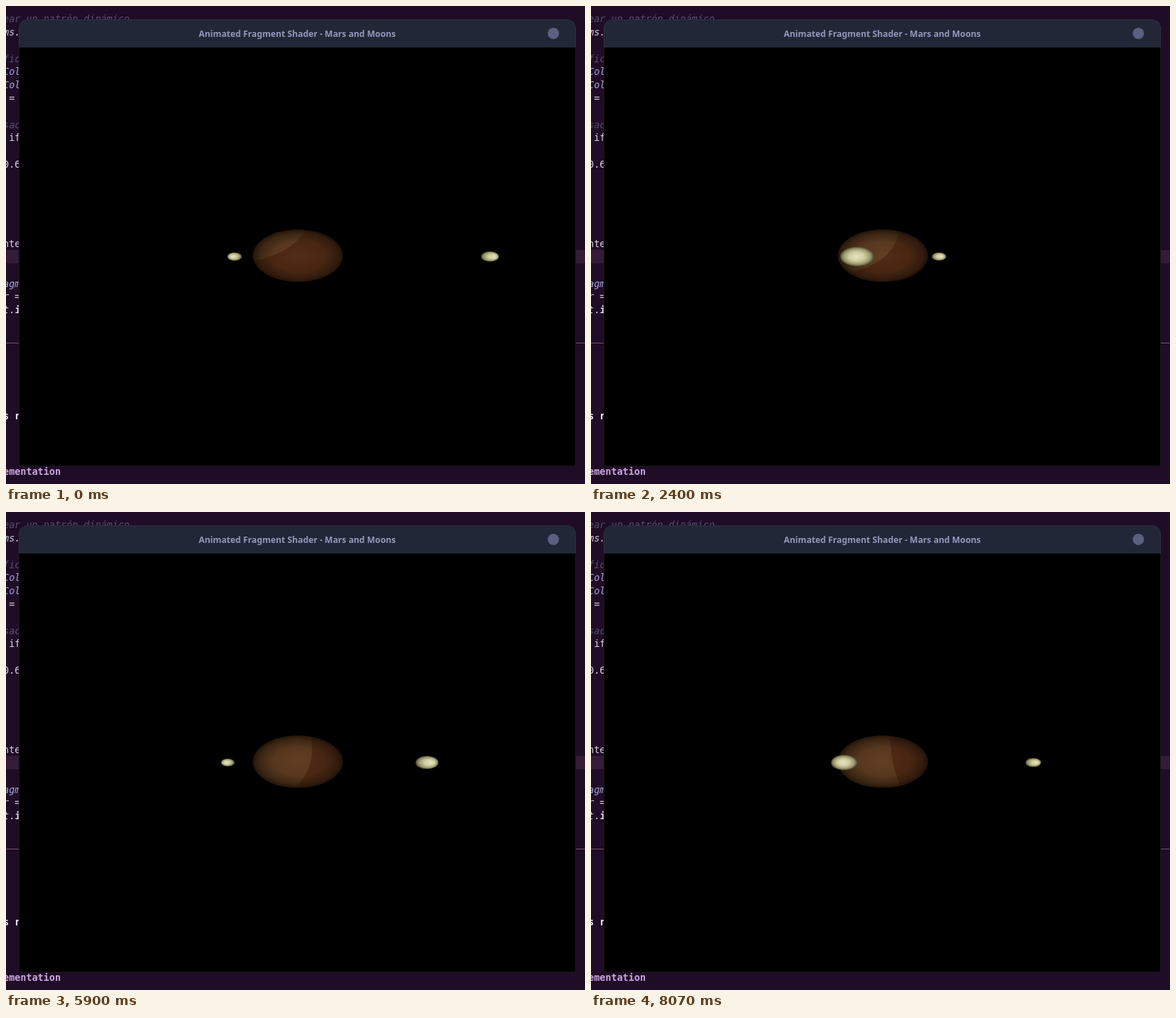
Recreate the animation shown at these times as an HTML page with a canvas. Size 824 by 680 pixels, loop 8.11 s.

```html
<!DOCTYPE html>
<html lang="en">
<head>
<meta charset="utf-8">
<title>Mars and Moons</title>
<style>
  html, body { margin: 0; width: 100%; height: 100%; overflow: hidden; background: #1f0c26; }
  #stage { position: relative; width: 824px; height: 680px; overflow: hidden; background: #1f0c26; }
  .strip { position: absolute; left: 0; width: 824px; }
  .band { top: 347px; height: 19px; background: #341b38; }
  .rule { top: 479px; height: 1px; background: #745668; }
  .code {
    position: absolute; left: -4px; white-space: pre;
    font: 13.6px/20px "DejaVu Sans Mono", monospace; color: #d6d2e0;
  }
  .note { color: #56506e; font-style: italic; }
  .type { color: #a3a3d6; font-style: italic; }
  .param { color: #d0cce0; font-style: italic; }
  .bold { color: #f4f0fa; font-weight: bold; }
  .head { color: #cca6e2; font-weight: bold; }
  #window {
    position: absolute; left: 18px; top: 19px; width: 793px; height: 636px;
    border-radius: 12px 12px 0 0; overflow: hidden; background: #000;
  }
  #window::after {
    content: ""; position: absolute; inset: 0; border-radius: inherit;
    box-shadow: inset 0 0 0 1px #3c3c4866;
  }
  #bar {
    height: 40px; background: #222737;
    font: bold 12.25px/42px "Noto Sans", "Open Sans", sans-serif;
    text-align: center; color: #9497bb;
  }
  #close {
    position: absolute; left: 753px; top: 12px; width: 16px; height: 16px;
    border-radius: 50%; background: #5a6081;
  }
  canvas { position: absolute; left: 0; top: 40px; }
</style>
</head>
<body>
<div id="stage">
  <div class="strip band"></div>
  <div class="strip rule"></div>
  <div class="code note" style="top:8px">ear un patrón dinámico</div>
  <div class="code param" style="top:27px">ms.</div>
  <div class="code note" style="top:65px">fic</div>
  <div class="code type" style="top:83px">Col</div>
  <div class="code type" style="top:102px">Col</div>
  <div class="code" style="top:121px"> =</div>
  <div class="code note" style="top:159px">sac</div>
  <div class="code" style="top:177px"> if</div>
  <div class="code" style="top:215px">0.6</div>
  <div class="code" style="top:328px">nte</div>
  <div class="code type" style="top:385px">agm</div>
  <div class="code" style="top:403px"><i>r</i> =</div>
  <div class="code" style="top:422px"><i>t</i>.<b>i</b></div>
  <div class="code bold" style="top:573px">s r</div>
  <div class="code head" style="top:652px">ementation</div>
  <div id="window">
    <div id="bar">Animated Fragment Shader - Mars and Moons</div>
    <div id="close"></div>
    <canvas id="view" width="793" height="596"></canvas>
  </div>
</div>
<script>
const LOOP = 8110, STEP = 100 / 3;
const ctx = document.getElementById('view').getContext('2d');
const planet = { x: 415.5, y: 355.3, rx: 64, ry: 37.3 };

// Angles in degrees, 0 = nearest to the viewer; depth is 1 / half width.
const moons = [
  { start: 97, rate: 0.0421, orbit: 22.12, depth: 0.0762, swing: 0.0339 },
  { start: 216, rate: 0.0282, orbit: 15.1, depth: 0.0785, swing: 0.0245 }
];

// Edge of the light region: time, then top, middle and bottom points.
const edges = [
  [0, 424, 322, 400, 345, 362, 361],
  [1100, 428, 325, 407, 350, 364, 369],
  [1570, 436, 323, 409, 354, 362, 374],
  [3270, 440, 326, 420, 365, 372, 384],
  [4830, 437, 326, 430, 362, 395, 388],
  [6770, 432, 323, 435, 355, 431, 391],
  [8070, 426, 325, 430, 358, 440, 390]
];

function edgeAt(t) {
  let i = 0;
  while (i < edges.length - 2 && t > edges[i + 1][0]) i++;
  const a = edges[i], b = edges[i + 1];
  const k = (t - a[0]) / (b[0] - a[0]);
  return a.slice(1).map((v, j) => v + (b[j + 1] - v) * k);
}

function radial(stops, fx = 0) {
  const g = ctx.createRadialGradient(fx, 0, 0, 0, 0, 1);
  stops.forEach(([at, color]) => g.addColorStop(at, color));
  return g;
}

function ball(x, y, rx, ry, fill) {
  ctx.save();
  ctx.translate(x, y);
  ctx.scale(rx, ry);
  ctx.beginPath();
  ctx.arc(0, 0, 1, 0, 2 * Math.PI);
  ctx.fillStyle = fill;
  ctx.fill();
  ctx.restore();
}

function drawPlanet(t) {
  const { x, y, rx, ry } = planet;
  ball(x, y, rx, ry, radial([[0, '#532c15'], [0.6, '#482612'], [0.9, '#321a0d'], [1, '#201209']]));

  const [tx, ty, mx, my, bx, by] = edgeAt(t);
  ctx.save();
  ctx.beginPath();
  ctx.moveTo(tx, 310);
  ctx.lineTo(tx, ty);
  ctx.quadraticCurveTo(2 * mx - (tx + bx) / 2, 2 * my - (ty + by) / 2, bx, by);
  ctx.lineTo(340, by);
  ctx.lineTo(340, 310);
  ctx.clip();
  ball(x, y, rx, ry, radial([[0, '#623f24'], [0.55, '#57371f'], [0.85, '#3c2613'], [1, '#23170b']]));
  ctx.restore();
}

function drawMoon({ angle, orbit, depth, swing }) {
  const side = Math.sin(angle);
  const r = 1 / (depth - swing * Math.cos(angle));
  const fill = radial([[0, '#e4e4c0'], [0.45, '#d0cfa2'], [0.8, '#98966a'], [1, '#4a4833']], 0.55 * side);
  ball(planet.x + orbit * side * r, 356.4, r * 1.02, r / 1.7, fill);
}

function draw(t) {
  ctx.setTransform(1, 0, 0, 1, 0, 0);
  ctx.clearRect(0, 0, 793, 596);
  ctx.translate(-18, -59);
  const now = moons.map(m => ({ ...m, angle: (m.start - m.rate * t) * Math.PI / 180 }));
  const isFront = m => Math.cos(m.angle) > 0;
  now.filter(m => !isFront(m)).forEach(drawMoon);
  drawPlanet(t);
  now.filter(isFront).forEach(drawMoon);
}

const begin = performance.now();
function tick() {
  const t = (performance.now() - begin) % LOOP;
  draw(Math.floor((t + 4) / STEP) * STEP);
  requestAnimationFrame(tick);
}
tick();
</script>
</body>
</html>
```
